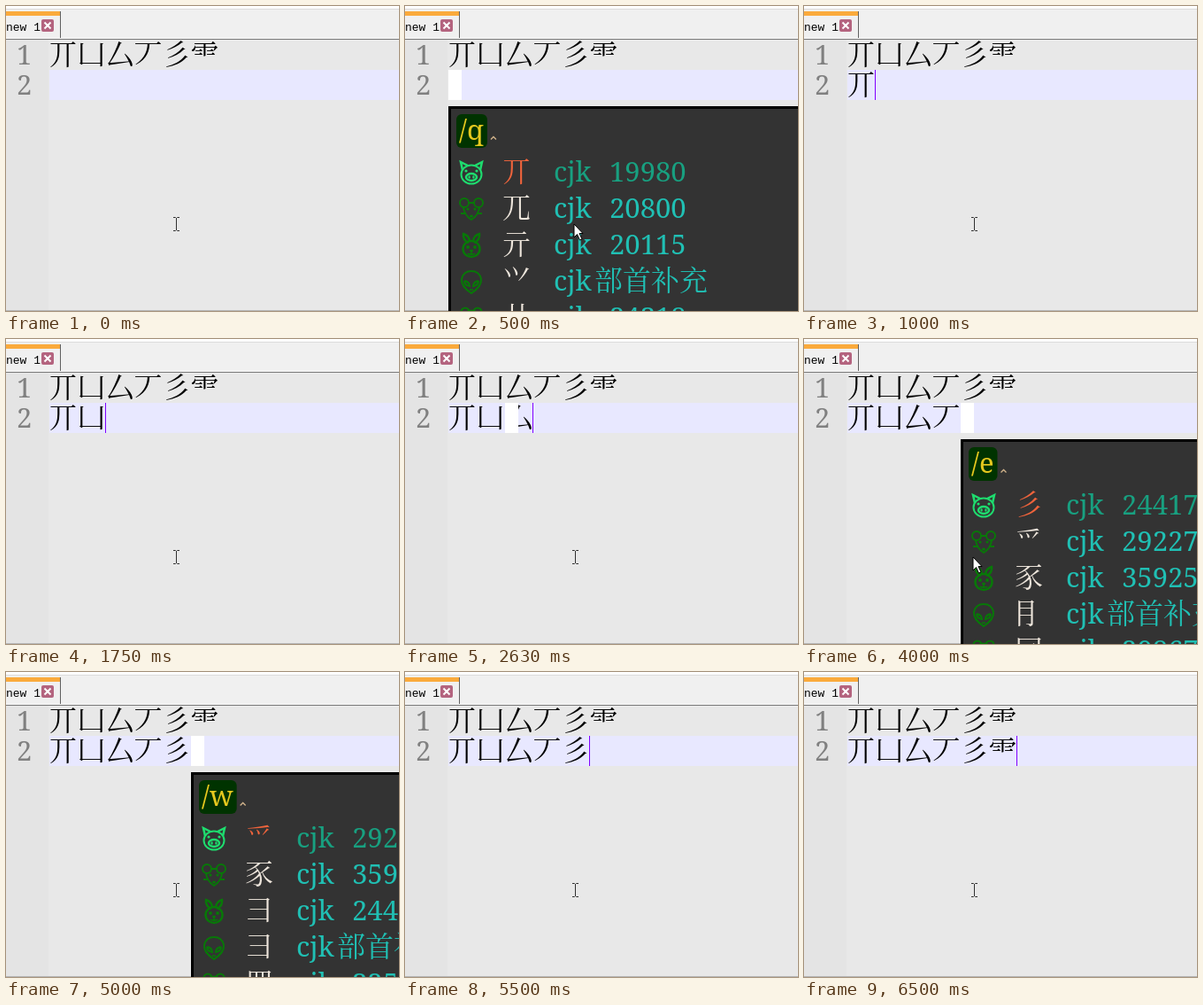
An HTML page with a canvas that plays this animation: 444x344 px, repeating every 6.94 s.

```html
<!DOCTYPE html>
<html lang="zh">
<head>
<meta charset="utf-8">
<style>
  html, body { margin: 0; width: 100%; height: 100%; overflow: hidden; background: #e8e8e8; }
  canvas { display: block; }
</style>
</head>
<body>
<canvas id="stage" width="444" height="344"></canvas>
<script>
const ctx = document.getElementById('stage').getContext('2d');
const LOOP = 6940;
const CHARS = [...'丌凵厶丆彡⻗'];
const CELL = 32, LEFT = 49, ROW_H = 34, LINE_2 = 72;
const CJK = '300 32px "Noto Serif CJK SC", "Noto Sans CJK SC", serif';
const LATIN = '31px "Noto Serif", serif';

// Radicals (below 0x2f00) are labelled by block, other characters by code point
const cjk = chars => [...chars].map(c => {
  const point = c.codePointAt(0);
  return [c, point < 0x2f00 ? '部首补充' : String(point)];
});

// Popups: typed code, candidates, width
const slash = { code: '/', items: [['/', '']], width: 227 };
const menu = (code, chars, width = 500) => ({ code, items: cjk(chars), width });
const menus = {
  q: menu('/q', '丌兀亓⺍廾'),
  k: menu('/k', '凵冂匚匸囗', 281),
  s: menu('/s', '厶亠么⺔幺'),
  c: menu('/c', '丆厂丁⺁广'),
  e: menu('/e', '彡爫豕⺝冃'),
  w: menu('/w', '爫豕彐⺕罒'),
  y: menu('/y', '⻗雨⻘')
};

// [start time, characters typed, popup, composition box, caret]
const timeline = [
  [0, 0],
  [370, 0, slash, true],
  [500, 0, menus.q, true],
  [870, 1, null, true, true],
  [1000, 1, null, false, true],
  [1250, 1, slash, true],
  [1370, 1, menus.k, true],
  [1750, 2, null, false, true],
  [2000, 2, slash, true],
  [2250, 2, menus.s, true],
  [2630, 3, null, true, true],
  [2750, 3, null, false, true],
  [3000, 3, slash, true],
  [3250, 3, menus.c, true],
  [3500, 4, null, false, true],
  [3870, 4, slash, true],
  [4000, 4, menus.e, true],
  [4380, 5, null, false, true],
  [5000, 5, menus.w, true],
  [5500, 5, null, false, true],
  [5750, 5, slash, true],
  [6130, 5],
  [6250, 5, menus.y, true],
  [6500, 6, null, false, true]
];

function rect(x, y, w, h, color) {
  ctx.fillStyle = color;
  ctx.fillRect(x, y, w, h);
}

function text(str, x, y, font, color) {
  ctx.font = font;
  ctx.fillStyle = color;
  ctx.fillText(str, x, y);
}

function strokePath(d, color, width = 1) {
  ctx.strokeStyle = color;
  ctx.lineWidth = width;
  ctx.stroke(new Path2D(d));
}

function ellipse(x, y, rx, ry = rx, fill = false) {
  ctx.beginPath();
  ctx.ellipse(x, y, rx, ry, 0, 0, Math.PI * 2);
  fill ? ctx.fill() : ctx.stroke();
}

const dots = (dx, y, rx, ry = rx) => [-dx, dx].forEach(x => ellipse(x, y, rx, ry, true));

const icons = [
  function pig(color) {
    ellipse(0, 2, 11.5, 10.5);
    strokePath('M-10-3L-12-12L-4-8M10-3L12-12L4-8', color, 2.5);
    ellipse(0, 5, 6, 4);
    dots(2.4, 5, 1.2, 1.8);
    dots(6, -2, 1.6);
  },
  function mouse(color) {
    ellipse(-8, -7, 5);
    ellipse(8, -7, 5);
    strokePath('M-9-2Q-8 7 0 12Q8 7 9-2M-3-7H3M-12 5L-6 5M12 5L6 5', color, 2);
    dots(4, 0, 1.6);
    ellipse(0, 8, 2, 1.6, true);
  },
  function rabbit(color) {
    strokePath('M-3-3Q-10-6-9-13Q-2-11-2-4M3-3Q10-6 9-13Q2-11 2-4', color, 2.5);
    ellipse(0, 4, 9.5, 9);
    dots(4, 2, 2);
    ellipse(0, 6, 2, 1.5, true);
    strokePath('M0 7V11M-4 9Q-2 11 0 9Q2 11 4 9', color, 1.5);
  },
  function alien(color) {
    strokePath('M0 13Q-12 5-11-3Q-9-12 0-12Q9-12 11-3Q12 5 0 13Z', color, 2);
    strokePath('M-8-1Q-2 0-2 5Q-8 4-8-1M8-1Q2 0 2 5Q8 4 8-1', color, 2);
    strokePath('M-2 9H2', color, 1.5);
  },
  function bear() {
    ellipse(-7, -7, 4.5);
    ellipse(7, -7, 4.5);
    ellipse(0, 2, 10.5);
    dots(4, 0, 1.5);
  }
];

function drawIcon(index, x, y, color) {
  ctx.save();
  ctx.translate(x, y);
  ctx.strokeStyle = ctx.fillStyle = color;
  ctx.lineWidth = 2;
  icons[index](color);
  ctx.restore();
}

function drawEditor() {
  rect(0, 0, 444, 344, '#e8e8e8');
  rect(0, 0, 444, 38, '#f0f0f0');
  rect(0, 0, 444, 3, '#ffffff');
  rect(0, 3, 444, 1, '#dcdcdc');
  rect(0, 36, 444, 1, '#f8f8f8');
  rect(0, 37, 444, 1, '#787878');
  rect(0, 6, 61, 5, '#faaa3c');
  rect(61, 6, 1, 30, '#606060');
  text('new 1', 0, 28, '13px "Liberation Mono", monospace', '#000');
  ctx.fillStyle = '#b4647f';
  ctx.beginPath();
  ctx.roundRect(40, 15, 14, 14, 2);
  ctx.fill();
  strokePath('M43.5 18.5L50.5 25.5M50.5 18.5L43.5 25.5', '#fff', 2);

  rect(0, 38, 48, 306, '#e4e4e4');
  rect(LEFT, LINE_2, 444, ROW_H, '#e8e8ff');
  rect(0, 343, 444, 1, '#b4b4b4');
  text('1', 12, 66, LATIN, '#808080');
  text('2', 12, 100, LATIN, '#808080');
}

function drawChars(count, baseline) {
  CHARS.slice(0, count).forEach((c, i) => text(c, LEFT - 0.5 + i * CELL, baseline, CJK, '#000'));
}

function drawPopup({ code, items, width }, x) {
  const y = 113, height = 61 + 41 * items.length;
  rect(x, y, width, height, '#000');
  rect(x + 3, y + 3, width - 6, height - 6, '#333');

  ctx.font = LATIN;
  const codeWidth = ctx.measureText(code).width;
  ctx.fillStyle = '#003300';
  ctx.beginPath();
  ctx.roundRect(x + 9, y + 9, codeWidth + 7, 38, 6);
  ctx.fill();
  text(code, x + 12, y + 38, LATIN, '#e6c81e');
  const hint = x + codeWidth + 20;
  strokePath(`M${hint} 150.5l3-3l3 3`, '#d2b48c', 1.3);

  items.forEach(([glyph, note], i) => {
    const base = y + 85 + i * 41;
    const noteColor = i ? '#20c0b4' : '#18a080';
    drawIcon(i, x + 26, base - 10, i ? '#087808' : '#1edc6e');
    text(glyph, x + 61, base, glyph === '/' ? LATIN : CJK, i ? '#eee6dc' : '#f0643c');
    if (!note) {
      text('〔半角〕', x + 99, base, CJK.replace('32px', '30px'), noteColor);
      return;
    }
    const isNumber = note < 'a';
    text('cjk', x + 119, base, LATIN, noteColor);
    text(note, x + (isNumber ? 182 : 165), base, isNumber ? LATIN : CJK, noteColor);
  });
}

function drawPointer(overPopup) {
  if (overPopup) {
    const arrow = new Path2D('M191 246V261L194.5 257.5L197.5 264L200 263L197 256.5H201Z');
    ctx.fillStyle = '#fff';
    ctx.fill(arrow);
    ctx.strokeStyle = '#000';
    ctx.lineWidth = 1;
    ctx.stroke(arrow);
  } else {
    strokePath('M189 238.5H191.5L192.5 239.5L193.5 238.5H196M192.5 239V253M189 253.5H191.5L192.5 252.5L193.5 253.5H196', '#303030');
  }
}

function draw(time) {
  const [, count, popup, composing, caret] = timeline.findLast(state => state[0] <= time);
  const x = LEFT + count * CELL;
  drawEditor();
  drawChars(CHARS.length, 66);
  drawChars(count, 100);
  // After a commit the box lingers over the new character
  if (composing) rect(popup ? x : x - CELL, LINE_2, 15, ROW_H, '#fff');
  if (caret) rect(x - 1, LINE_2, 1, ROW_H, '#8000ff');
  if (popup) drawPopup(popup, x);
  drawPointer(popup && popup !== slash && x < 191);
}

const start = performance.now();
function tick() {
  draw((performance.now() - start) % LOOP);
  requestAnimationFrame(tick);
}
tick();
</script>
</body>
</html>
```
